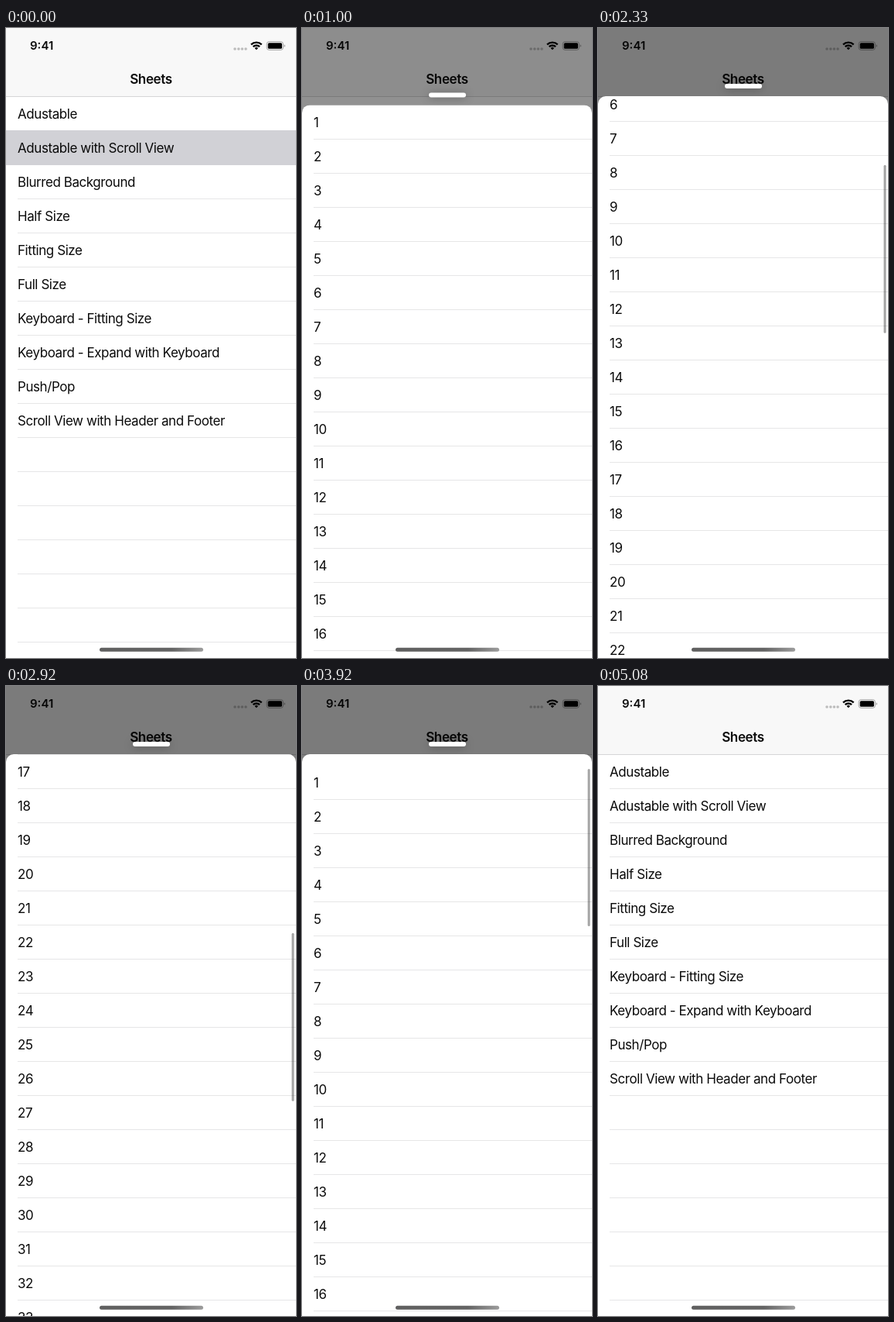
Write an HTML page that moves like this. It is 375 px wide and 813 px high and loops after 5510 ms.

```html
<!DOCTYPE html>
<html lang="en">
<head>
<meta charset="utf-8">
<title>Sheets</title>
<style>
  html, body { margin: 0; width: 100%; height: 100%; overflow: hidden; background: #fff; }
  svg { display: block; width: 100%; height: 100%; }
  text { font-family: Inter, "Liberation Sans", sans-serif; fill: #0b0b0b; }
  .row { font-size: 17px; letter-spacing: -0.43px; }
  .title { font-size: 17px; font-weight: 600; letter-spacing: -0.35px; text-anchor: middle; }
  .clock { font-size: 15px; font-weight: 600; }
  .line { fill: #e6e6e7; shape-rendering: crispEdges; }
  .grip { fill: #fff; filter: drop-shadow(0 1px 6px rgba(0, 0, 0, 0.3)); }
</style>
</head>
<body>
<svg viewBox="0 0 375 813" xmlns="http://www.w3.org/2000/svg">
  <defs>
    <linearGradient id="homeFill">
      <stop offset="0" stop-color="#606060"/>
      <stop offset="0.7" stop-color="#646464"/>
      <stop offset="1" stop-color="#9c9c9c"/>
    </linearGradient>
    <clipPath id="sheetClip"><rect width="375" height="900" rx="10"/></clipPath>
  </defs>

  <rect width="375" height="813" fill="#fff"/>
  <g id="menu"></g>

  <rect width="375" height="88" fill="#f8f8f8"/>
  <rect y="88" width="375" height="1" fill="#d6d6d7"/>
  <text class="title" x="187.5" y="72">Sheets</text>
  <text class="clock" x="31" y="28.3">9:41</text>
  <g fill="#bcbcbc">
    <circle cx="296" cy="27" r="1.8"/><circle cx="300.8" cy="27" r="1.8"/>
    <circle cx="305.4" cy="27" r="1.8"/><circle cx="310" cy="27" r="1.8"/>
  </g>
  <g fill="none" stroke="#000" stroke-width="2.4">
    <path d="M317 21.4a9.8 9.8 0 0 1 13.6 0"/>
    <path d="M319.6 24.2a6 6 0 0 1 8.4 0"/>
    <path d="M323.8 28.2l-2.2-2.3a3.2 3.2 0 0 1 4.4 0z" fill="#000" stroke="none"/>
  </g>
  <rect x="337.2" y="17.7" width="21.2" height="10.6" rx="2.9" fill="none" stroke="#a2a2a2"/>
  <rect x="338.7" y="19.2" width="18.2" height="7.6" rx="1.6"/>
  <path d="M359.7 21.2q1.4.5 1.4 1.8t-1.4 1.8z" fill="#a2a2a2"/>

  <rect id="dim" width="375" height="813"/>

  <g id="sheet">
    <rect class="grip" x="164" y="-16" width="48" height="6" rx="3"/>
    <g clip-path="url(#sheetClip)">
      <rect width="375" height="900" fill="#fff"/>
      <g id="numbers"></g>
      <rect id="bar" x="369.5" width="3" rx="1.5"/>
    </g>
  </g>

  <rect x="121" y="799.8" width="134" height="5" rx="2.5" fill="url(#homeFill)"/>
</svg>
<script>
const LOOP = 5510, FPS = 12;
const ROW = 44, FULL = 88, HIDDEN = 840;
const PULL = 110, SCROLL = 704, BOUNCE = 19;
const $ = id => document.getElementById(id);

function add(parent, tag, attrs, label = "") {
  const el = document.createElementNS("http://www.w3.org/2000/svg", tag);
  set(el, attrs);
  el.textContent = label;
  return parent.appendChild(el);
}

function set(el, attrs) {
  for (const name in attrs) el.setAttribute(name, attrs[name]);
}

function addRows(parent, labels, y0) {
  labels.forEach((label, i) => {
    const y = y0 + i * ROW;
    add(parent, "rect", { class: "line", x: 15, y: y + ROW, width: 360, height: 1 });
    if (label) add(parent, "text", { class: "row", x: 15, y: y + 28.7 }, label);
  });
}

const items = ["Adustable", "Adustable with Scroll View", "Blurred Background", "Half Size",
  "Fitting Size", "Full Size", "Keyboard - Fitting Size", "Keyboard - Expand with Keyboard",
  "Push/Pop", "Scroll View with Header and Footer"];
addRows($("menu"), items.concat(Array(6).fill("")), FULL);
const pick = add($("menu"), "rect", { y: FULL + ROW, width: 375, height: ROW + 1, fill: "#d1d1d6" });
$("menu").insertBefore(pick, $("menu").querySelectorAll("text")[1]);
addRows($("numbers"), Array.from({ length: 50 }, (_, i) => String(i + 1)), 0);

const span = (u, from, to) => Math.min(1, Math.max(0, (u - from) / (to - from)));
const smooth = p => p * p * (3 - 2 * p);
const easeOut = (p, power) => 1 - (1 - p) ** power;

// Position of the list; after the flick back it overshoots and settles.
function scrollAt(u) {
  const down = easeOut(span(u, 25, 35), 1.12);
  const back = smooth(span(u, 36, 45));
  const rest = Math.max(0, u - 45);
  return SCROLL * (down - back) - BOUNCE * rest * Math.exp(1 - rest);
}

// Top edge of the sheet: slide in, pull down and release, slide out.
function topAt(u) {
  const shown = easeOut(span(u, 0, 5), 2.4) - smooth(span(u, 55, 61));
  const pulled = smooth(span(u, 11, 16)) - easeOut(span(u, 17, 22), 4.6);
  return HIDDEN + (FULL - HIDDEN) * shown + PULL * pulled;
}

function draw(ms) {
  // The screen refreshes in whole steps; the margin absorbs rounding to 10 ms.
  const u = Math.floor((ms % LOOP + 4) * FPS / 1000);
  const offset = scrollAt(u);
  const opened = span(u, 0, 5);
  const shade = 0.43 + 0.07 * span(u, 18, 22);

  set($("sheet"), { transform: `translate(0 ${topAt(u)})` });
  set($("numbers"), { transform: `translate(0 ${-offset})` });
  set($("dim"), { opacity: shade * (opened - span(u, 55, 61)) });
  set(pick, { opacity: 1 - opened });
  // The thumb shrinks while the list is pulled past its top.
  set($("bar"), {
    y: 19 + Math.max(0, offset) * 0.3008,
    height: 217 + Math.min(0, offset),
    opacity: 0.36 * (span(u, 25, 26) - span(u, 55, 58))
  });
}

const start = performance.now();
function tick() {
  draw(performance.now() - start);
  requestAnimationFrame(tick);
}
tick();
</script>
</body>
</html>
```
